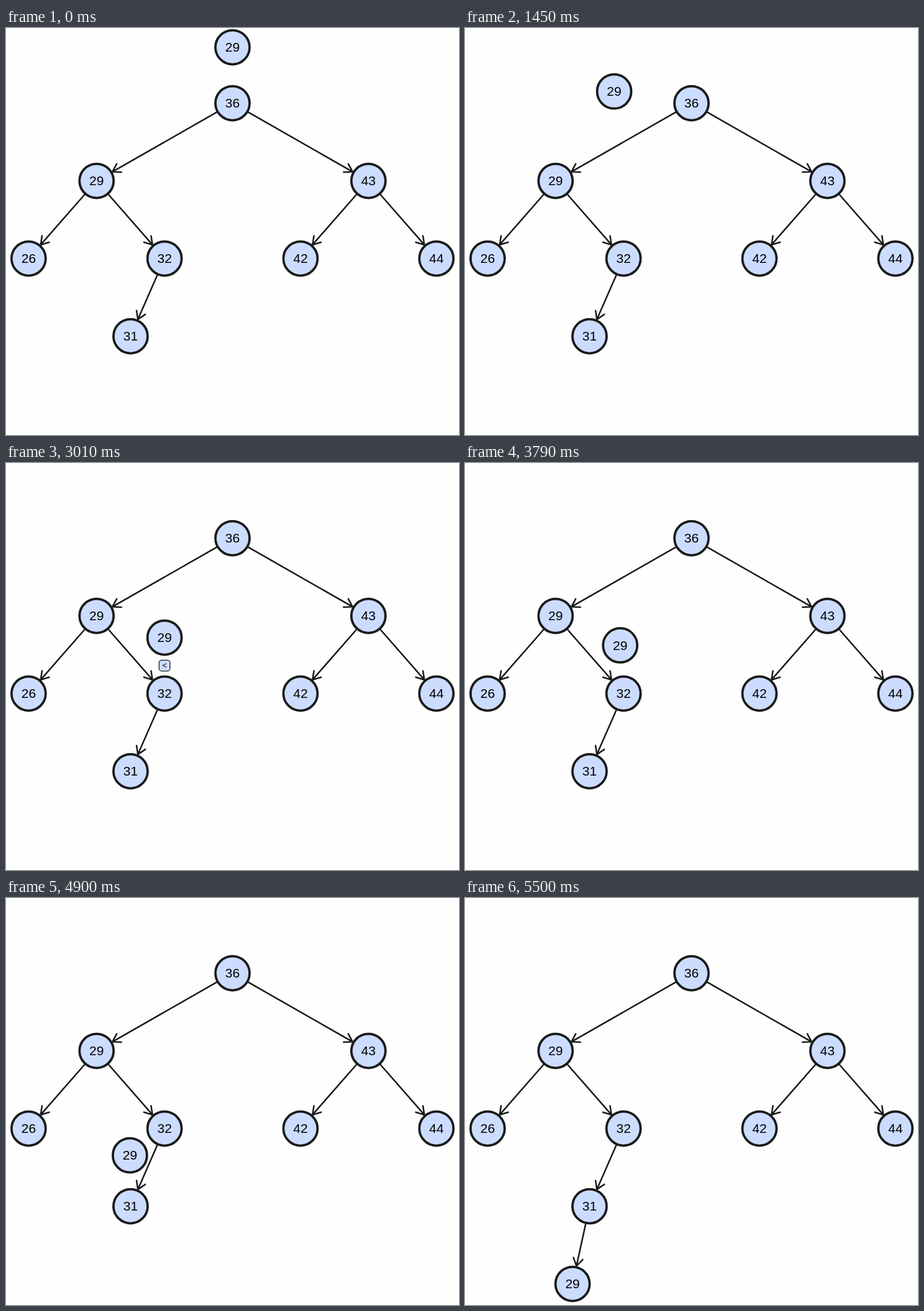
Animation, 729 px wide and 655 px high, one loop 6.39 s. Source, as an HTML page:

```html
<!DOCTYPE html>
<html lang="en">
<head>
<meta charset="utf-8">
<title>Binary search tree insertion</title>
<style>
  html, body { margin: 0; width: 100%; height: 100%; overflow: hidden; background: #fefefe; }
  svg { display: block; width: 729px; height: 655px; }
  circle, rect { fill: #ccdcff; stroke: #1a1a1a; }
  circle { stroke-width: 3.75; }
  rect { stroke-width: 1.25; }
  path { fill: none; stroke: #1a1a1a; stroke-width: 2.5; stroke-linecap: round; }
  text { font: 21px Arial, "Liberation Sans", sans-serif; text-anchor: middle; fill: #000; }
  .sign text { font-size: 12.5px; }
</style>
</head>
<body>
<svg id="stage" viewBox="0 0 729 655"></svg>
<script>
const LOOP = 6390, TICK = 79;
const RADIUS = 27.5, EDGE = 29.4, HEAD = 14.5, SPREAD = 32 * Math.PI / 180;
const HOVER = 90; // height of the travelling node above the one it is compared with

const place = (column, level) => ({ x: 364.5 + column * 109.375, y: 121 + level * 125 });
const root = place(0, 0), left = place(-2, 1), right = place(2, 1);
const inner = place(-1, 2), leaf = place(-1.5, 3), slot = place(-1.75, 4);
const outerLeft = place(-3, 2), rightLeft = place(1, 2), rightRight = place(3, 2);
const above = p => ({ x: p.x, y: p.y - HOVER });

const stage = document.getElementById('stage');

function add(parent, tag, attributes = {}, content = '') {
  const element = document.createElementNS('http://www.w3.org/2000/svg', tag);
  for (const key in attributes) element.setAttribute(key, attributes[key]);
  element.textContent = content;
  return parent.appendChild(element);
}

const moveTo = (element, p) => element.setAttribute('transform', `translate(${p.x} ${p.y})`);
const show = (element, visible) => element.setAttribute('visibility', visible ? 'visible' : 'hidden');

function addNode(p, value) {
  const group = add(stage, 'g');
  add(group, 'circle', { r: RADIUS });
  add(group, 'text', { y: 7.2 }, value);
  moveTo(group, p);
  return group;
}

function addArrow(from, to) {
  const angle = Math.atan2(to.y - from.y, to.x - from.x);
  const polar = (p, a, r) => ({ x: p.x + r * Math.cos(a), y: p.y + r * Math.sin(a) });
  const pair = p => `${p.x.toFixed(2)} ${p.y.toFixed(2)}`;
  const tip = polar(to, angle, -EDGE);
  const wing = side => pair(polar(tip, angle + side * SPREAD, -HEAD));
  return add(stage, 'path', {
    d: `M${pair(polar(from, angle, RADIUS))}L${pair(tip)}M${wing(-1)}L${pair(tip)}L${wing(1)}`
  });
}

[[root, left], [root, right], [left, outerLeft], [left, inner],
 [right, rightLeft], [right, rightRight], [inner, leaf]].forEach(edge => addArrow(...edge));
const newArrow = addArrow(leaf, slot);

[[root, 36], [left, 29], [right, 43], [outerLeft, 26], [inner, 32],
 [rightLeft, 42], [rightRight, 44], [leaf, 31]].forEach(node => addNode(...node));
const traveller = addNode(above(root), 29);

const sign = add(stage, 'g', { class: 'sign' });
add(sign, 'rect', { x: -8.75, y: -8.75, width: 17.5, height: 17.5, rx: 4 });
const signText = add(sign, 'text', { y: 4.4 });

const moves = [
  { start: 980, end: 1850, duration: 868, from: above(root), to: above(left) },
  { start: 2460, end: 3010, duration: 548, from: above(left), to: above(inner) },
  { start: 3700, end: 4110, duration: 405, from: above(inner), to: above(leaf) },
  { start: 4800, end: 5500, duration: 675, from: above(leaf), to: slot }
];
const comparisons = [
  { start: 370, end: 980, node: root, text: '<' },
  { start: 1850, end: 2460, node: left, text: '≥' },
  { start: 3010, end: 3700, node: inner, text: '<' },
  { start: 4110, end: 4800, node: leaf, text: '<' }
];

function travellerAt(time) {
  const move = moves.filter(m => time >= m.start).pop();
  if (!move) return above(root);
  if (time >= move.end) return move.to;
  // Motion advances in coarse ticks.
  const elapsed = Math.floor((time - move.start + 6) / TICK) * TICK;
  const u = Math.min(1, elapsed / move.duration);
  const eased = u * u * (3 - 2 * u);
  const mix = (a, b) => a + (b - a) * eased;
  return { x: mix(move.from.x, move.to.x), y: mix(move.from.y, move.to.y) };
}

function draw(time) {
  moveTo(traveller, travellerAt(time));
  show(newArrow, time >= 5500);
  const comparison = comparisons.find(c => time >= c.start && time < c.end);
  show(sign, comparison);
  if (comparison) {
    moveTo(sign, { x: comparison.node.x, y: comparison.node.y - HOVER / 2 });
    signText.textContent = comparison.text;
  }
}

const origin = performance.now();
function frame() {
  draw((performance.now() - origin) % LOOP);
  requestAnimationFrame(frame);
}
frame();
</script>
</body>
</html>
```
